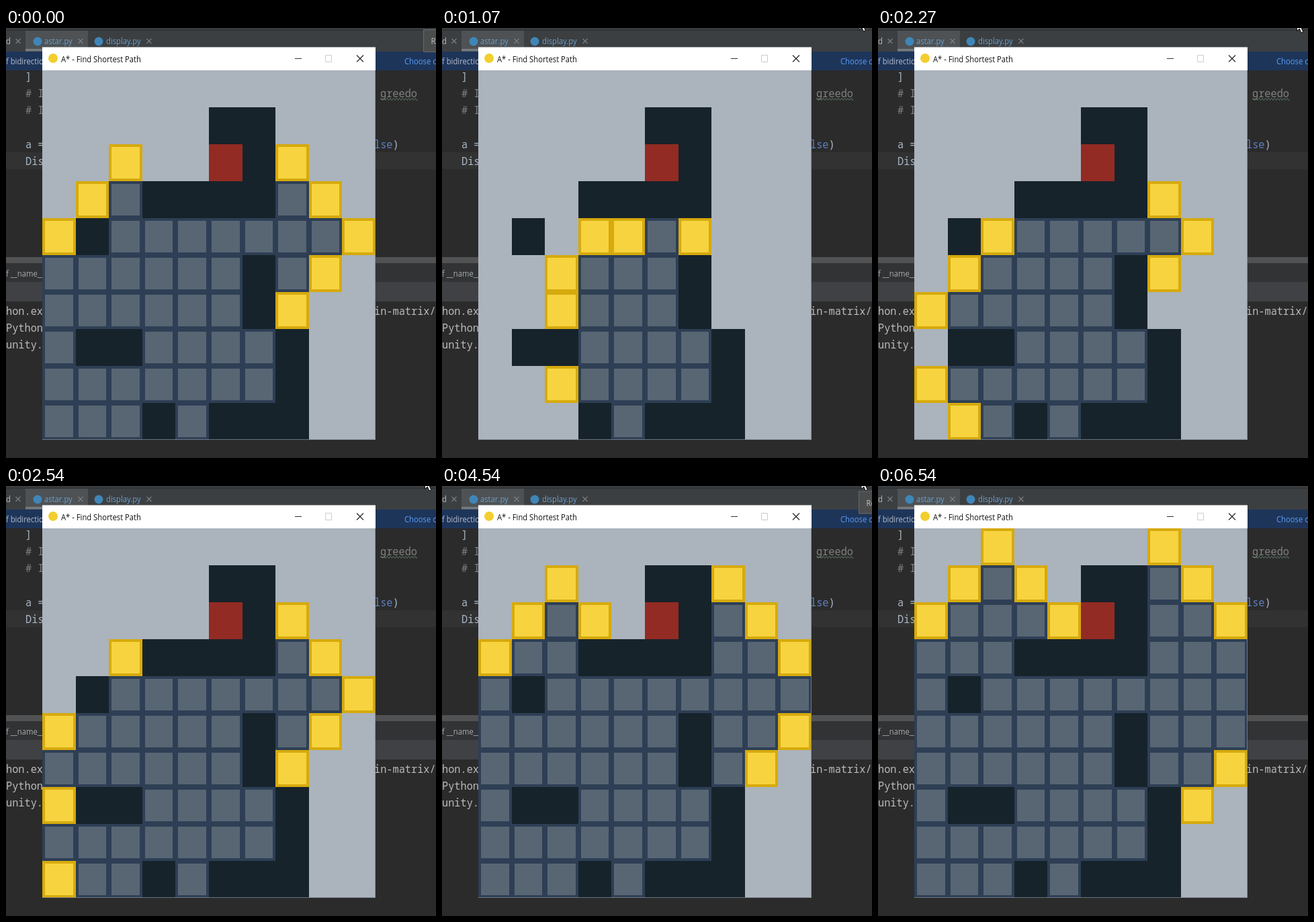
Write an HTML page that moves like this. It is 640 px wide and 640 px high and loops after 8000 ms.

```html
<!DOCTYPE html>
<html lang="en">
<head>
<meta charset="utf-8">
<title>A* - Find Shortest Path</title>
<style>
  html, body { margin: 0; width: 100%; height: 100%; overflow: hidden; background: #2b2b2b; }
  svg { display: block; width: 640px; height: 640px; }
  text { white-space: pre; }
  .ui { font: 12.5px "Open Sans", "Noto Sans", sans-serif; }
  .code { font: 17px "Noto Sans Mono", "DejaVu Sans Mono", monospace; }
</style>
</head>
<body>
<svg id="stage" viewBox="0 0 640 640"></svg>
<script>
const LOOP = 8000;
const NS = 'http://www.w3.org/2000/svg';
const stage = document.getElementById('stage');

function add(tag, attrs, parent = stage) {
  const el = document.createElementNS(NS, tag);
  for (const key in attrs) el.setAttribute(key, attrs[key]);
  return parent.appendChild(el);
}
const rect = (x, y, width, height, fill, parent) =>
  add('rect', { x, y, width, height, fill }, parent);
const line = (d, stroke, width = 1, parent) =>
  add('path', { d, stroke, fill: 'none', 'stroke-width': width }, parent);
const cross = (x, y, r, stroke, width) =>
  line(`M${x - r} ${y - r}l${2 * r} ${2 * r}m0 ${-2 * r}l${-2 * r} ${2 * r}`, stroke, width);

// The whole screen is squeezed horizontally, so all lettering shares one scale.
function label(kind, x, y, str, fill, parent) {
  const el = add('text', { class: kind, fill, transform: `translate(${x} ${y}) scale(.9 1)` }, parent);
  el.textContent = str;
  return el;
}
const ui = (...args) => label('ui', ...args);
const code = (...args) => label('code', ...args);

function drawEditor() {
  rect(0, 0, 640, 640, '#2b2b2b');
  rect(0, 0, 640, 35, '#3c3f41');
  rect(0, 2.5, 640, 1.5, '#2f3133');
  rect(29, 4, 93, 31, '#4e5254');
  rect(29, 31, 93, 3.5, '#747a80');
  rect(0, 35, 640, 28, '#1e355a');

  ui(0, 24, 'd', '#bbbbbb');
  ui(57, 24, 'astar.py', '#6a9fce');
  ui(149, 24, 'display.py', '#6a9fce');
  for (const x of [18, 111, 213]) cross(x, 19.5, 3.5, '#7d8083', 1.1);
  for (const cx of [47, 138]) add('circle', { cx, cy: 20, r: 6.5, fill: '#3f86b8' });
  ui(0, 54, 'f bidirectional', '#b4bccb');
  ui(593, 54, 'Choose c', '#589df6');

  rect(0, 185, 640, 25, '#323232');
  code(29, 78, ']', '#a9b7c6');
  code(29, 103, '# I', '#808080');
  code(29, 128, '# I', '#808080');
  code(29, 179, 'a =', '#a9b7c6');
  code(29, 204, 'Dis', '#a9b7c6');
  code(557, 103, 'greedo', '#808080');
  line('M557 106' + 'q1.15 -3 2.3 0t2.3 0'.repeat(12), '#62806a', 0.9);
  code(548, 179, 'lse', '#5f7fc0');
  code(575.5, 179, ')', '#a9b7c6');

  rect(0, 341, 640, 9, '#515253');
  rect(0, 350, 640, 28, '#313335');
  rect(0, 378, 640, 29, '#3f4145');
  ui(0, 370, 'f __name__', '#a9acb0');
  code(0, 427, 'hon.exe', '#bbbbbb');
  code(0, 452, 'Python', '#bbbbbb');
  code(0, 477, 'unity.', '#bbbbbb');
  code(548, 427, 'in-matrix/', '#bbbbbb');
}

function drawWindow() {
  rect(54, 28.5, 496, 34.5, '#ffffff');
  add('circle', { cx: 70, cy: 45, r: 7, fill: '#f2cf2e' });
  ui(82, 50.5, 'A* - Find Shortest Path', '#111111');
  line('M430 45.5h10', '#333333');
  line('M475.5 40.5h9v10h-9z', '#cccccc');
  cross(527, 45.5, 5, '#222222', 1.1);
  rect(54, 63, 496, 550, '#abb3bc');
}

// Step at which each cell is first reached; # is a wall, R the goal.
const REACHED = [
  '..6....5..', '.646.##45.', '64346R#245', '432####124', '3#10000112',
  '210000#124', '110000#245', '2##0000#5.', '1100000#..', '211#0###..'
];
// Step at which each cell has been expanded.
const EXPANDED = [
  '..........', '..6....5..', '.646...45.', '643....245', '4.21101124',
  '321000.245', '211000.45.', '3..0000...', '2110000...', '321.0.....'
];
const CELL_W = 49.6, CELL_H = 55;
const OPEN = ['#d6aa0c', '#f7d340'];
const DONE = ['#2e3f55', '#586674'];

function buildGrid() {
  const cells = [];
  REACHED.forEach((row, r) => [...row].forEach((mark, c) => {
    if (mark === '.') return;
    const x0 = Math.round(54 + c * CELL_W), x1 = Math.round(54 + (c + 1) * CELL_W);
    const y = 63 + r * CELL_H, w = x1 - x0;
    if (mark === '#' || mark === 'R') {
      rect(x0, y, w, CELL_H, mark === '#' ? '#17232b' : '#922b23');
      return;
    }
    const group = add('g', {});
    const last = EXPANDED[r][c];
    cells.push({
      group,
      outer: rect(x0, y, w, CELL_H, OPEN[0], group),
      inner: rect(x0 + 4, y + 4, w - 8, CELL_H - 8, OPEN[1], group),
      reached: +mark,
      expanded: last === '.' ? Infinity : +last
    });
  }));
  line('M54 612.5H549.5V63', '#7d8791', 0.8);
  return cells;
}

function buildTooltip() {
  const group = add('g', {});
  add('rect', { x: 0.5, y: 0.5, width: 90, height: 33, fill: '#4b4d4d', stroke: '#66696b' }, group);
  ui(11.5, 22, 'Reader mode', '#c0c4c8', group);
  return group;
}

drawEditor();
drawWindow();
const cells = buildGrid();
const tooltip = buildTooltip();
const cursor = add('path', {
  d: 'M0 0V16.5L3.8 13L6.4 19L9.2 17.8L6.7 12H12Z',
  fill: '#ffffff', stroke: '#000000', 'stroke-width': 0.9
});

// [time, value...]; every value holds until the next entry.
const STEPS = [[0, 3], [540, 0], [1540, 1], [2540, 2], [3540, 3], [4540, 4], [5540, 5], [6540, 6]];
const TIPS = [[0, 621, 2], [500, 700, 0], [3540, 620, 7.5], [6540, 700, 0]];
const POINTER = [
  [0, 619, -18.5], [600, 619, -18], [900, 619, -17], [960, 620, -16], [1010, 620.5, -15],
  [1070, 621, -14], [1700, 622, -14], [1870, 622.5, -13], [2200, 623, -12.5],
  [2240, 623.5, -12], [3040, 624, -12], [4700, 625, -11], [4734, 627, -6],
  [4768, 630, 0], [4802, 633, 5], [4836, 637, 9], [4870, 660, 9]
];

const held = (table, t) => table.findLast(entry => entry[0] <= t);
const place = (el, [, x, y]) => el.setAttribute('transform', `translate(${x} ${y})`);

let shown = -1;
function showStep(step) {
  if (step === shown) return;
  shown = step;
  for (const cell of cells) {
    const [edge, face] = step >= cell.expanded ? DONE : OPEN;
    cell.group.setAttribute('visibility', step >= cell.reached ? 'visible' : 'hidden');
    cell.outer.setAttribute('fill', edge);
    cell.inner.setAttribute('fill', face);
  }
}

const start = performance.now();
function frame() {
  const t = (performance.now() - start) % LOOP;
  showStep(held(STEPS, t)[1]);
  place(tooltip, held(TIPS, t));
  place(cursor, held(POINTER, t));
  requestAnimationFrame(frame);
}
frame();
</script>
</body>
</html>
```
